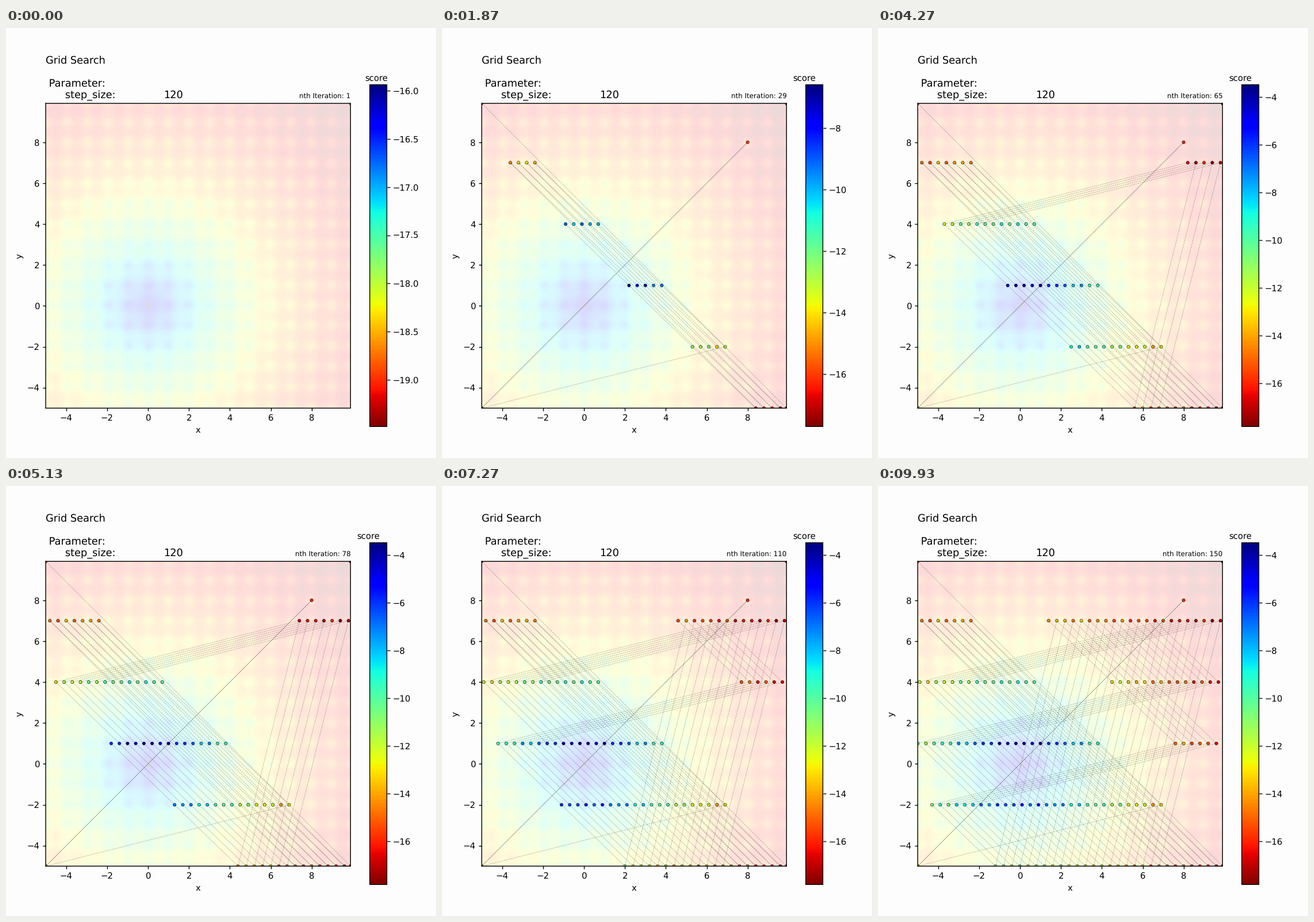
Write a matplotlib script that moves like this. It is 748 px wide and 748 px high and loops after 9.99 s.

```python
import numpy as np
import matplotlib.pyplot as plt
from matplotlib.animation import FuncAnimation

SIZE = 748
N_ITER = 150
LOOP_MS = 9990
STEP_SIZE = 120

# Soft, unsnapped edges and unhinted text, with slightly heavy frame lines.
plt.rc("path", snap=False)
plt.rc("text", hinting="none")
plt.rc("axes", linewidth=0.96)
plt.rc("xtick.major", width=0.96)
plt.rc("ytick.major", width=0.96)

axis = np.arange(-5, 10, 0.1)
DIM = len(axis)


def score(x, y):
    """Negative Ackley function."""
    bowl = -20 * np.exp(-0.2 * np.sqrt(0.5 * (x**2 + y**2)))
    waves = -np.exp(0.5 * (np.cos(2 * np.pi * x) + np.cos(2 * np.pi * y)))
    return -(bowl + waves + np.e + 20)


def search_path():
    """Four corners, one warm start, then a strided walk over the grid."""
    last = DIM - 1
    cells = [(last, last), (0, last), (last, 0), (0, 0), (130, 130)]
    direction = DIM - 1  # coprime with the number of cells
    for k in range(N_ITER - len(cells)):
        pointer = k * STEP_SIZE * direction % DIM**2
        cells.append(divmod(pointer, DIM))
    return axis[np.array(cells)]


def box(left, top, width, height):
    """Pixel box with a top-left origin, as figure fractions."""
    return [left / SIZE, 1 - (top + height) / SIZE, width / SIZE, height / SIZE]


path = search_path()
scores = score(path[:, 0], path[:, 1])
lows = np.minimum.accumulate(scores)
highs = np.maximum.accumulate(scores)
# A single score has no range, so it is widened by a tenth each way.
lows[0], highs[0] = 1.1 * scores[0], 0.9 * scores[0]

fig = plt.figure(figsize=(7, 7), dpi=SIZE / 7, facecolor="#fdfdfe")
ax = fig.add_axes(box(69.1, 131.1, 530.2, 530.2))
cax = fig.add_axes(box(632.8, 98.7, 29.7, 594.5))

ax.imshow(
    score(*np.meshgrid(axis, axis)),
    cmap="jet_r",
    alpha=0.15,
    origin="lower",
    extent=[axis[0], axis[-1], axis[0], axis[-1]],
    aspect="auto",
)
dots = ax.scatter(
    path[:1, 0],
    path[:1, 1],
    c=scores[:1],
    cmap="jet_r",
    vmin=lows[0],
    vmax=highs[0],
    marker="H",
    s=15,
    edgecolors="black",
    linewidth=0.4,
)
(trail,) = ax.plot([], [], "--", color="black", alpha=0.33, linewidth=0.5)

ax.set_xlim(axis[0], axis[-1])
ax.set_ylim(axis[0], axis[-1])
ax.set_xticks(range(-4, 9, 2))
ax.set_yticks(range(-4, 9, 2))
ax.set_xlabel("x")
ax.set_ylabel("y")

ax.set_title("Grid Search\n\n Parameter:\n      step_size:", loc="left")
fig.text(274 / SIZE, 1 - 122.2 / SIZE, str(STEP_SIZE), fontsize=12)
counter = ax.set_title("", loc="right", fontsize=8)

bar = fig.colorbar(dots, cax=cax)
bar.set_label("score", labelpad=-50, y=1.03, rotation=0)


def update(i):
    n = i + 1
    trail.set_data(path[:n, 0], path[:n, 1])
    dots.set_offsets(path[:n])
    dots.set_array(scores[:n])
    dots.set_clim(lows[i], highs[i])
    counter.set_text(f"nth Iteration: {n}")
    return trail, dots, counter


anim = FuncAnimation(
    fig, update, frames=N_ITER, interval=LOOP_MS / N_ITER, repeat=True, blit=False
)
plt.show()
```
